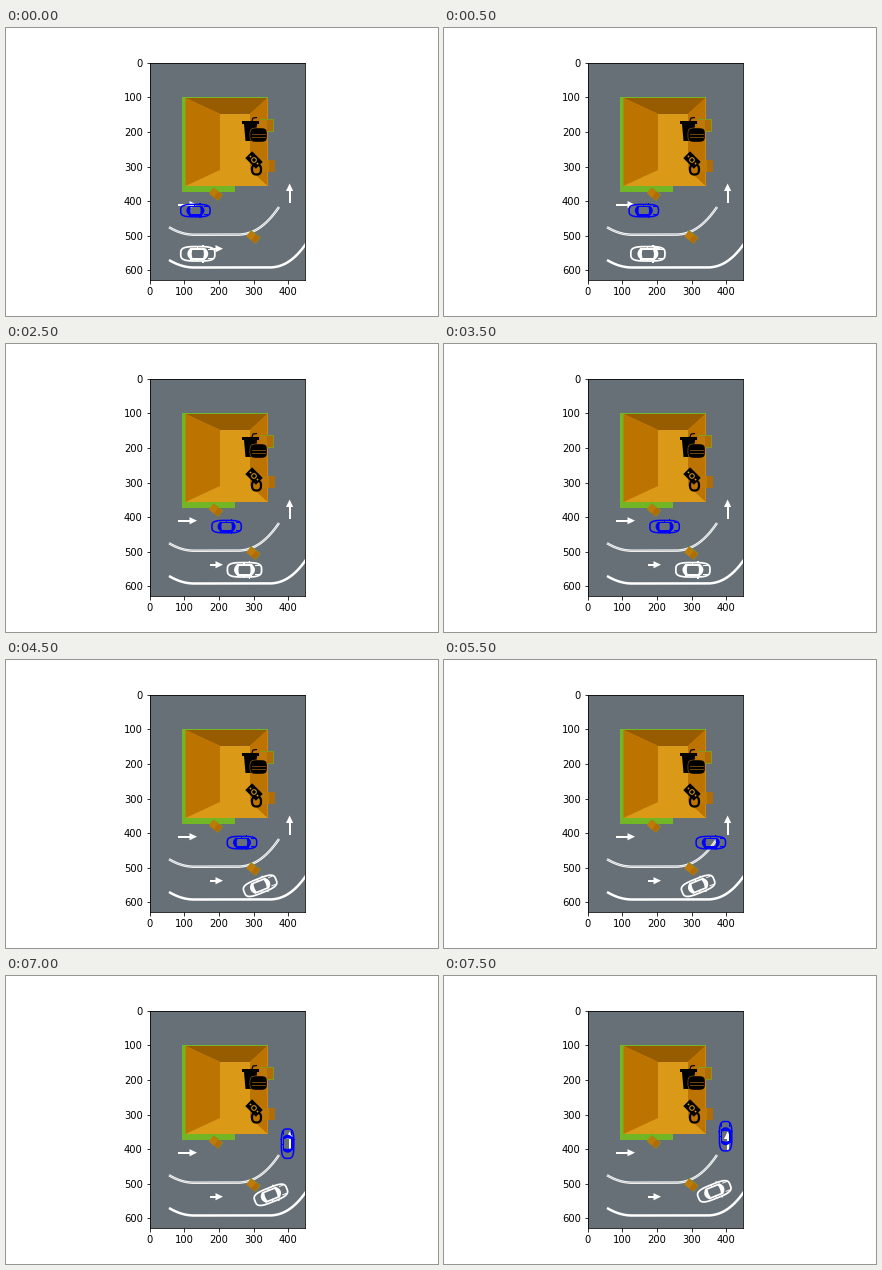
These frames come from a looping animation (432x288 px, 8 s). A matplotlib script:

```python
import numpy as np
import matplotlib.pyplot as plt
from matplotlib.animation import FuncAnimation
from matplotlib.patches import Circle, Polygon
from matplotlib.transforms import Affine2D

W, H, DPI = 432, 288, 72
ROAD, GREEN, EDGE = "#677077", "#72b626", "#7f9a1c"
FLOOR, WALL, SHADE = "#da9a18", "#bd7300", "#985c00"

fig, ax = plt.subplots(figsize=(W / DPI, H / DPI), dpi=DPI)
fig.subplots_adjust(left=0.125, right=0.9, bottom=0.125, top=0.88)
ax.set(xlim=(-0.5, 448.5), ylim=(627.5, -0.5), aspect="equal", facecolor=ROAD,
       xticks=range(0, 401, 100), yticks=range(0, 601, 100))
ax.set_autoscale_on(False)

# Stage pixels, y pointing down
stage = Affine2D().scale(1 / DPI, -1 / DPI).translate(0, H / DPI) + fig.dpi_scale_trans


def placed(x, y, deg=0, scale=1):
    return Affine2D().scale(scale).rotate_deg(deg).translate(x, y) + stage


def put(patch, trans):
    patch.set_transform(trans)
    return ax.add_patch(patch)


def poly(points, color, trans=stage):
    return put(Polygon(points, fc=color, lw=0), trans)


def box(x, y, w, h, color, trans=stage):
    """Rectangle centred on (x, y)."""
    corners = np.array([(-1, -1), (1, -1), (1, 1), (-1, 1)]) * (w / 2, h / 2)
    return poly(corners + (x, y), color, trans)


def stroke(points, color, lw, trans=stage, closed=False):
    return put(Polygon(points, closed=closed, fc="none", ec=color, lw=lw,
                       capstyle="butt", joinstyle="round"), trans)


def rounded(a, b, n=4):
    """Superellipse with half axes a and b."""
    t = np.linspace(0, 2 * np.pi, 80, endpoint=False)
    c, s = np.cos(t), np.sin(t)
    return np.column_stack([a * np.sign(c) * abs(c) ** (2 / n),
                            b * np.sign(s) * abs(s) ** (2 / n)])


def corners(left, top, right, bottom):
    return [(left, top), (right, top), (right, bottom), (left, bottom)]


def building():
    poly(corners(176, 69, 262, 158), GREEN)
    poly(corners(176, 69, 229, 164), GREEN)
    outer, inner = corners(179.5, 70, 261.5, 158), corners(214, 86, 244, 142)
    poly(outer, FLOOR)
    for k, color in enumerate((SHADE, WALL, FLOOR, WALL)):
        j = (k + 1) % 4
        poly([outer[k], outer[j], inner[j], inner[k]], color)


def block(x, y, w, h, deg=0):
    """Small wooden box with a green rim and a darker far side."""
    t = placed(x, y, deg)
    box(0, 0, w, h, EDGE, t)
    box(-0.3, 0.3, w - 0.8, h - 0.8, "#be7908", t)
    box(w / 4, 0.3, w / 2 - 1, h - 0.8, "#b06c06", t)


def food():
    stroke([(246, 93), (247, 90), (251, 89.5)], "k", 1.2)
    box(244.5, 94, 17, 3, "k")
    poly([(238, 96), (251, 96), (249.5, 113), (239.5, 113)], "k")
    burger = placed(252.5, 107)
    stroke(rounded(8.2, 6.7), WALL, 1.2, burger, closed=True)
    poly(rounded(8.3, 6.8), "k", burger)
    for y in (-0.5, 2.5):
        box(0, y, 14, 0.4, "#6a4408", burger)


def money():
    hand, note = placed(250.5, 141.5), placed(248, 132, 45)
    stroke(rounded(4.5, 5, 2.5), "k", 2.2, hand, closed=True)
    box(0, 0, 15, 9.6, "k", note)
    put(Circle((0, 0), 2.3, fc="none", ec=FLOOR, lw=1), note)
    for x in (-5, 5):
        put(Circle((x, 0), 0.9, fc=FLOOR, lw=0), note)


def arrow(x, y, length, deg=0):
    """Arrow with its tip at (x, y)."""
    t = placed(x, y, deg)
    box(-length / 2 - 3, 0, length - 6, 2, "w", t)
    poly([(0, 0), (-7.5, -3.6), (-7.5, 3.6)], "w", t)


def lane(y, bend, end, rise):
    """Kerb line: short dip in, level stretch, then a growing climb."""
    x = np.linspace(163, end, 150)
    dip = np.clip((188 - x) / 25, 0, 1) ** 2 * 7.5
    climb = np.clip((x - bend) / (end - bend), 0, 1) ** 2.3 * rise
    return np.column_stack([x, y - dip - climb])


class Car:
    """Outlined car seen from above, nose to the right, 31 px long at scale 1."""

    def __init__(self, color, scale):
        self.scale = scale
        y = np.linspace(-4.8, 4.8, 25)
        bulge = 1 - (y / 4.8) ** 2
        self.parts = [stroke(rounded(14.7, 6.2, 3.4), color, 1.5 * scale, closed=True)]
        for s in (-1, 1):
            glass = np.column_stack([s * (6.5 + 2.5 * bulge), y])
            roof = np.column_stack([s * (4.6 + 0.6 * bulge), 0.75 * y])[::-1]
            self.parts += [
                poly(np.vstack([glass, roof]), color),
                box(0, 4.2 * s, 13, 1.5, color),
                box(-0.5, 5.4 * s, 1, 2, color),
                box(4.5, 6.7 * s, 1.2, 1.6, color),
                box(11, 3.8 * s, 4, 0.8, color)]

    def move(self, x, y, deg):
        t = placed(x, y, deg, self.scale)
        for p in self.parts:
            p.set_transform(t)


building()
for x, y in ((260.8, 97.3), (262.5, 138)):
    block(x, y, 13.5, 12.5)
food()
money()

upper = lane(206.7, 230, 273, 27.7)
stroke(upper, "w", 2.4)
stroke(upper, "#a9afb3", 0.6)
stroke(lane(239.5, 262, 300.5, 24.5), "w", 2.5)
arrow(283.6, 155.5, 19.5, -90)
arrow(191, 176.7, 19)
arrow(217, 220.7, 13)
for x, y in ((210, 166), (247.5, 209)):
    block(x, y, 12, 8, 38)

blue, white = Car("#0000ff", 1), Car("w", 36 / 31)


def steps(i, start, stop):
    """Steps made so far between two moments."""
    return np.clip(i - start, 0, stop - start)


def update(i):
    if i < 13:
        blue.move(189.4 + 10.4 * steps(i, 0, 3) + 15.4 * steps(i, 8, 12), 182.6, 0)
    else:
        blue.move(281.6, 175.2 - 7.5 * steps(i, 13, 15), -90)
    ahead = 12.1 * steps(i, 0, 3) + 5.2 * steps(i, 3, 8)
    turned = steps(i, 12, 15)
    white.move(191.8 + ahead + 5.4 * turned, 225.8 - 3.5 * turned, -22 if i > 8 else 0)
    return blue.parts + white.parts


anim = FuncAnimation(fig, update, frames=16, interval=500, repeat=True, repeat_delay=0)
plt.show()
```
